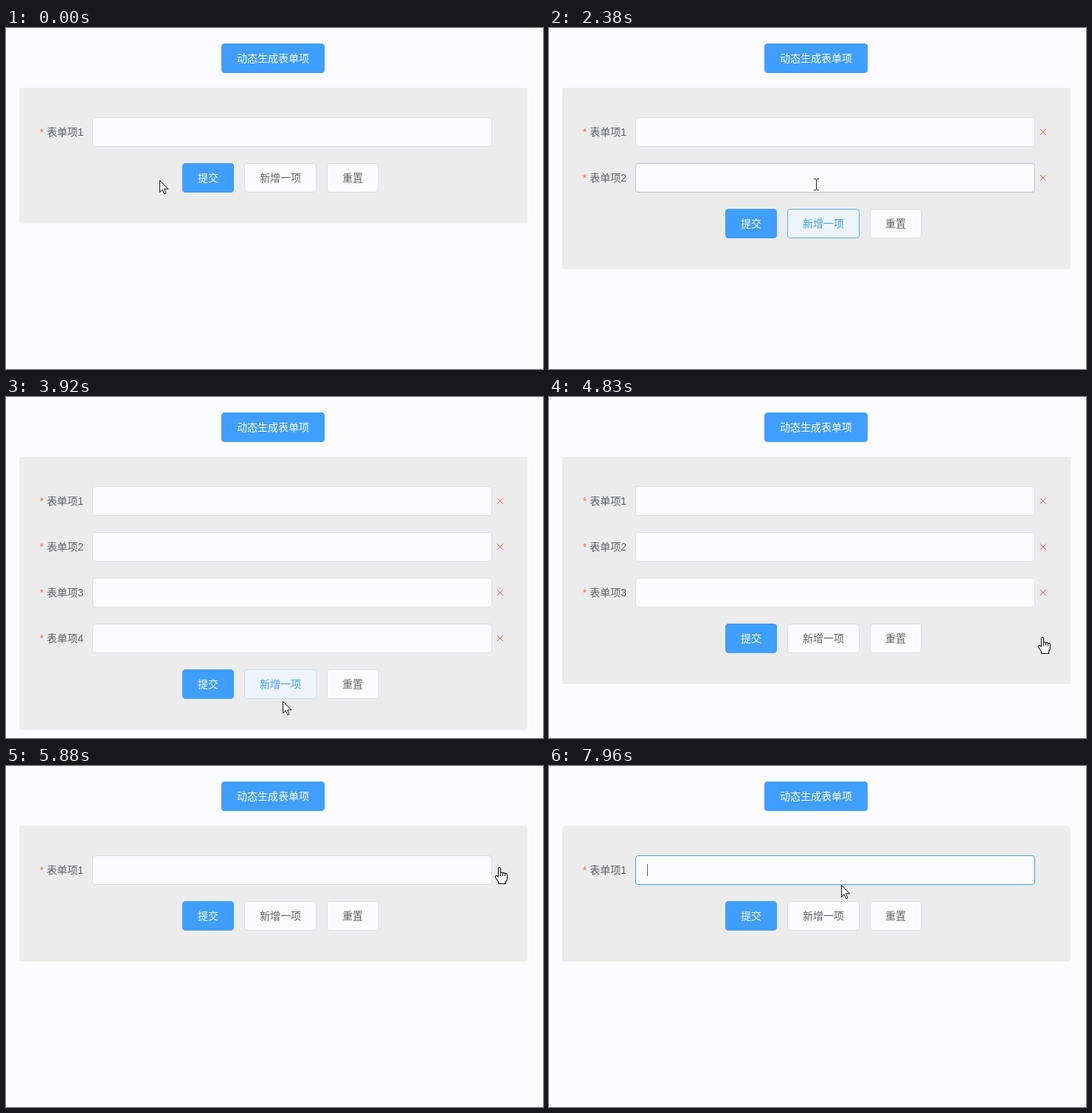
An HTML page for the animation above (8000 ms loop, 728 px wide and 462 px high).

```html
<!DOCTYPE html>
<html lang="zh">
<head>
<meta charset="utf-8">
<title>动态生成表单项</title>
<style>
html, body { margin: 0; width: 100%; height: 100%; overflow: hidden; background: #fcfcfe; }
#stage {
  position: absolute; left: 0; top: 0; width: 728px; height: 462px; overflow: hidden;
  font: 14px/40px "Liberation Sans", "Noto Sans CJK SC", "Noto Sans CJK", sans-serif; color: #606266;
}
#stage div { position: absolute; box-sizing: border-box; }
#panel { left: 18px; top: 81px; width: 689px; background: #ececec; border-radius: 3px; }
.btn {
  height: 40px; line-height: 38px; text-align: center; border-radius: 4px;
  border: 1px solid #dcdfe6; background: #fcfcfe; white-space: nowrap;
}
.primary { background: #409eff; border-color: #409eff; color: #fcfcfe; }
.row { left: 0; width: 728px; height: 40px; }
.label { right: 623px; white-space: nowrap; }
.label i { font-style: normal; color: #f56c6c; margin-right: 4px; }
.input { left: 117px; width: 542px; height: 40px; border-radius: 4px; border: 1px solid #dcdfe6; background: #fcfcfe; }
.row svg { position: absolute; left: 664.5px; top: 15px; }
#caret { left: 133px; top: 133px; width: 1px; height: 16px; background: #606266; }
#pointer { position: absolute; left: 0; top: 0; }
</style>
</head>
<body>
<div id="stage">
  <div id="page">
    <div class="btn primary" style="left:292px;top:21px;width:140px">动态生成表单项</div>
    <div id="panel"></div>
    <div id="rows"></div>
    <div id="buttons">
      <div class="btn primary" style="left:239px;width:70px">提交</div>
      <div class="btn" id="add" style="left:323px;width:98px">新增一项</div>
      <div class="btn" style="left:435px;width:70px">重置</div>
    </div>
    <div id="caret"></div>
  </div>
  <svg id="pointer" width="728" height="462">
    <g id="cursor" stroke-linejoin="round">
      <path id="arrow" d="M.5.5V16.5L4.2 13 6.8 18.8 9 17.8 6.5 12H11.8Z" fill="#fff" stroke="#111"/>
      <g id="hand" fill="#fff" stroke="#111" stroke-width="1.1">
        <path d="M-1.5 13V2Q-1.5.5 0 .5T1.5 2V7.5Q3 6.3 4.5 8 6 7 7.5 8.8 10.5 8 10.5 11V15Q10.5 17.5 8.5 19.5V22.5H-1.5V20L-5.5 14Q-6 11.5-4 11.5Z"/>
        <path d="M1.5 7.5V12M4.5 8V12M7.5 9V12.5" fill="none"/>
      </g>
      <path id="beam" d="M-3-7.5H-1L.5-6.5 2-7.5H4M.5-6.5V6.5M-3 7.5H-1L.5 6.5 2 7.5H4" fill="none" stroke="#222"/>
      <g id="spinner" fill="none" stroke-width="3">
        <circle r="6.3" stroke="#6fcdb4"/>
        <path d="M-6.3 0A6.3 6.3 0 0 1 0-6.3" stroke="#35796f"/>
        <path d="M0 6.3A6.3 6.3 0 0 0 6.3 0" stroke="#d4efe6"/>
      </g>
    </g>
  </svg>
</div>
<script>
const LOOP = 8000, LOADED = 1960, FOCUS = 6760;
const FIRST = 121, PITCH = 62;
const adds = [2240, 2800, 3400], removes = [4800, 5200, 5880];

// pointer strokes: start, end, then the point reached
const home = { x: 208, y: 206 };
const strokes = [
  [920, 1170, 331, 230], [1170, 1350, 461, 186], [1350, 1540, 439, 208],
  [LOADED - 1, LOADED, 361, 208], [2320, 2700, 373, 265], [3000, 3260, 374, 327],
  [3480, 3790, 374, 408], [3790, 3920, 375, 412], [4080, 4640, 669, 325],
  [4960, 5270, 670, 264], [5380, 5740, 669, 137], [5900, 6450, 394, 149],
  [6900, 7400, 469, 180], [7540, 7950, 396, 161]
];

const $ = id => document.getElementById(id);
const show = (el, on) => { el.style.visibility = on ? "inherit" : "hidden"; };
const clamp = v => Math.max(0, Math.min(1, v));
const pulse = (t, a, b) => clamp((t - a) / 100) * clamp((b + 100 - t) / 100);
const mix = (a, b, k) => a.map((v, i) => v + (b[i] - v) * k);
const rgb = c => `rgb(${c.map(Math.round)})`;
const passed = (times, t) => times.filter(v => v <= t).length;
const count = t => 1 + passed(adds, t) - passed(removes, t);

const GREY = [220, 223, 230], DARK = [192, 196, 204], TEXT = [96, 98, 102];
const WHITE = [252, 252, 254], BLUE = [64, 158, 255], PALE = [236, 245, 255], RIM = [198, 226, 255];

const rows = [1, 2, 3, 4].map(n => {
  const row = document.createElement("div");
  row.className = "row";
  row.style.top = FIRST + PITCH * (n - 1) + "px";
  row.innerHTML = `<div class="label"><i>*</i>表单项${n}</div><div class="input"></div>
    <svg width="10" height="10"><path d="M.8.8 8.8 9M8.8.8.8 9" stroke="#e8504c" fill="none"/></svg>`;
  $("rows").append(row);
  return row;
});

// The hit test uses the layout seen at the pointer's latest move.
function pointerAt(t) {
  let { x, y } = home, moved = 0;
  for (const [a, b, tx, ty] of strokes) {
    if (t < a) break;
    const u = clamp((t - a) / (b - a)), k = u * u * (3 - 2 * u);
    x += (tx - x) * k;
    y += (ty - y) * k;
    moved = Math.min(t, b);
  }
  x = Math.round(x);
  y = Math.round(y);
  return { x, y, ...hit(x, y, count(moved), t) };
}

function hit(x, y, n, t) {
  const row = Math.floor((y - FIRST) / PITCH);
  const inside = y >= FIRST && (y - FIRST) % PITCH < 40;
  const within = (a, b) => x >= a && x < b;
  if (t < LOADED || !inside || row > n) return { kind: "arrow" };
  if (row === n) {
    const onButton = within(239, 309) || within(323, 421) || within(435, 505);
    return { kind: onButton ? "hand" : "arrow" };
  }
  if (within(117, 659)) return { kind: "beam", over: row };
  return { kind: n > 1 && within(664, 676) ? "hand" : "arrow" };
}

function drawForm(t, over) {
  const n = count(t);
  show($("page"), t < 280 || t >= 500);
  $("panel").style.height = 184 + PITCH * (n - 1) + "px";
  $("buttons").style.top = FIRST + PITCH * n + "px";
  rows.forEach((row, i) => {
    row.style.display = i < n ? "block" : "none";
    row.lastElementChild.style.display = n > 1 ? "block" : "none";
    const focus = i === 0 ? clamp((t - FOCUS) / 200) : 0;
    row.querySelector(".input").style.borderColor = rgb(mix(i === over ? DARK : GREY, BLUE, focus));
  });

  const lit = pulse(t, adds[0] - 70, removes[0] - 100);
  const press = Math.max(...adds.map(a => pulse(t, a - 60, a + 120)));
  const add = $("add").style;
  add.color = rgb(mix(TEXT, BLUE, lit));
  add.background = rgb(mix(WHITE, PALE, lit));
  add.borderColor = rgb(mix(mix(GREY, RIM, lit), BLUE, press));
  show($("caret"), t >= FOCUS && (t - FOCUS) % 1000 < 500);
}

function drawPointer(t, { x, y, kind }) {
  $("cursor").setAttribute("transform", `translate(${x} ${y})`);
  for (const id of ["arrow", "hand", "beam"]) show($(id), id === kind);
  show($("spinner"), t >= 80 && t < LOADED);
  $("spinner").setAttribute("transform", `translate(15 0) rotate(${Math.min(t, 1540) * 0.36})`);
}

const start = performance.now();
function frame() {
  const t = (performance.now() - start) % LOOP;
  const pointer = pointerAt(t);
  drawForm(t, pointer.over);
  drawPointer(t, pointer);
  requestAnimationFrame(frame);
}
frame();
</script>
</body>
</html>
```
